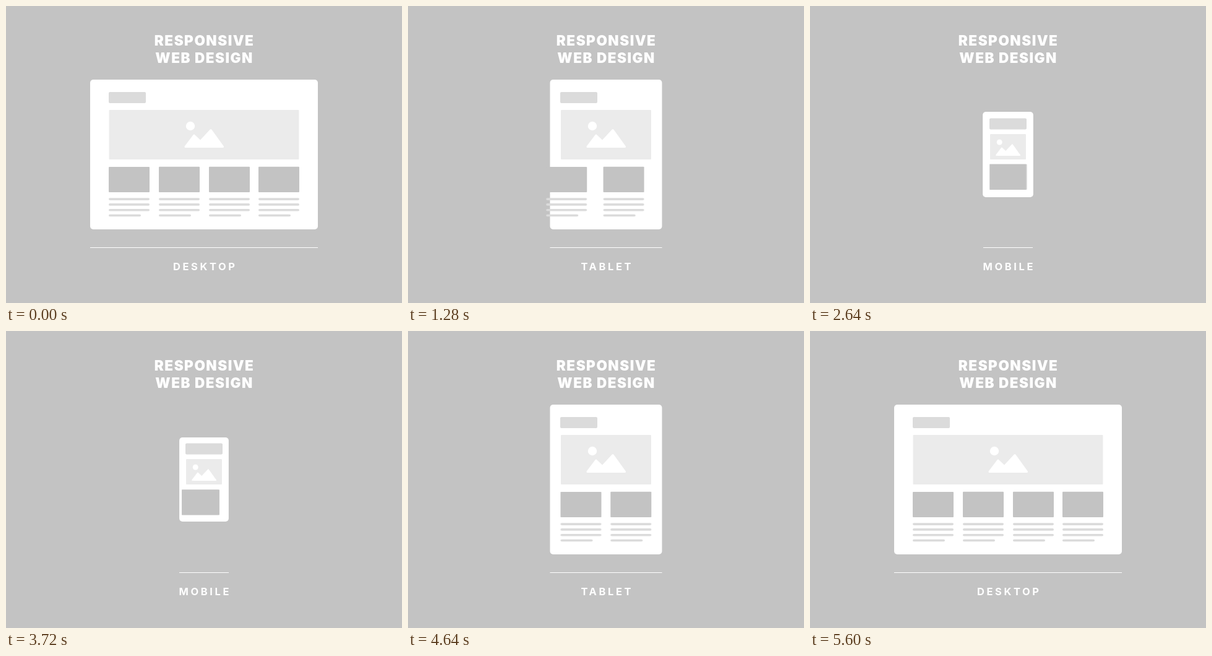
Recreate the animation shown at these times as an HTML page. Size 640x480 px, loop 5.72 s.

```html
<!DOCTYPE html>
<html lang="en">
<head>
<meta charset="utf-8">
<title>Responsive Web Design</title>
<style>
html, body { margin: 0; width: 100%; height: 100%; overflow: hidden; background: #c3c3c3; }
svg { display: block; width: 640px; height: 480px; }

.move { animation: 5720ms cubic-bezier(.65, 0, .35, 1) infinite; }
.show { animation: 5720ms step-end infinite; }

text { font-family: Inter, "Open Sans", sans-serif; fill: #fff; text-anchor: middle; }
.title { font-size: 22.5px; font-weight: 900; letter-spacing: 1.5px; }
.label { font-size: 16.5px; font-weight: 700; letter-spacing: 3.6px; }
.white { fill: #fff; }
.bar { fill: #dbdbdb; }
.card { fill: #c3c3c3; }
.hero { fill: #ebebeb; }
.fold { transform-box: fill-box; transform-origin: center; }

#panel { animation-name: panel; }
#rule { animation-name: rule; }
#logo { animation-name: logo; }
#hero { animation-name: hero-size, hero-y; }
#icon { animation-name: icon; }
#first { animation-name: slide-first; }
#second { animation-name: slide-second; }
#second-fold { animation-name: fold-second; }
#pair { animation-name: fold-pair; }
#main-card { animation-name: main-card; }
#l1 { animation-name: l1; }
#l2 { animation-name: l2; }
#l3 { animation-name: l3; }
#l4 { animation-name: l4; }
#desktop { animation-name: desktop; }
#tablet { animation-name: tablet; }
#mobile { animation-name: mobile; }

/* Desktop > tablet > mobile > tablet > desktop */
@keyframes panel {
  0%, 15.035% { x: 136px; y: 119px; width: 368px; height: 242px; }
  20.385% { x: 229.5px; y: 119px; width: 181px; height: 242px; }
  36.014% { x: 229.5px; y: 119px; width: 181px; height: 242px; animation-timing-function: cubic-bezier(.2, .8, .3, 1); }
  50.35% { x: 280px; y: 172px; width: 80px; height: 136px; }
  65.035% { x: 280px; y: 172px; width: 80px; height: 136px; animation-timing-function: cubic-bezier(.68, -.6, .32, 1.6); }
  72.098% { x: 229.5px; y: 119px; width: 181px; height: 242px; }
  85.315% { x: 229.5px; y: 119px; width: 181px; height: 242px; animation-timing-function: cubic-bezier(.68, -.6, .32, 1.6); }
  95.804%, 100% { x: 136px; y: 119px; width: 368px; height: 242px; }
}
@keyframes rule {
  0%, 15.035% { x: 136px; width: 368px; }
  20.629%, 36.014% { x: 229.5px; width: 181px; }
  41.958%, 66.084% { x: 280px; width: 80px; }
  73.077%, 87.832% { x: 229.5px; width: 181px; }
  95.035%, 100% { x: 136px; width: 368px; }
}
@keyframes logo {
  0%, 15.385% { x: 166px; y: 139px; }
  20.979%, 36.364% { x: 246px; y: 139px; }
  42.308%, 67.832% { x: 290px; y: 181.5px; }
  72.867%, 90.909% { x: 246px; y: 139px; }
  96.503%, 100% { x: 166px; y: 139px; }
}
@keyframes hero-size {
  0%, 15.734% { x: 166.5px; width: 307px; height: 80px; }
  21.678%, 36.713% { x: 247px; width: 146px; height: 80px; }
  43.007%, 65.734% { x: 291px; width: 58px; height: 41px; }
  71.294%, 88.811% { x: 247px; width: 146px; height: 80px; }
  96.154%, 100% { x: 166.5px; width: 307px; height: 80px; }
}
@keyframes hero-y {
  0%, 36.713% { y: 168px; }
  43.007%, 67.832% { y: 207px; }
  72.867%, 100% { y: 168px; }
}
@keyframes icon {
  0%, 36.713% { transform: translate(320px, 229px) scale(1); }
  43.007%, 68.741% { transform: translate(320px, 242px) scale(.625); }
  72.937%, 100% { transform: translate(320px, 229px) scale(1); }
}
@keyframes slide-first {
  0%, 18.531% { transform: translateX(0); }
  25.175% { transform: translateX(80.5px); }
  89.161% { transform: translateX(80.5px); animation-timing-function: cubic-bezier(.68, -.6, .32, 1.6); }
  97.902%, 100% { transform: translateX(0); }
}
@keyframes slide-second {
  0%, 18.182% { transform: translateX(0); }
  24.476% { transform: translateX(80.3px); }
  90.909% { transform: translateX(80.3px); animation-timing-function: cubic-bezier(.68, -.6, .32, 1.6); }
  97.902%, 100% { transform: translateX(0); }
}
@keyframes fold-second {
  0%, 36.014% { transform: scaleX(1); }
  39.51%, 66.434% { transform: scaleX(0); }
  70.455%, 100% { transform: scaleX(1); }
}
@keyframes fold-pair {
  0%, 15.035% { transform: scaleX(1); }
  20.385%, 92.308% { transform: scaleX(0); }
  97.902%, 100% { transform: scaleX(1); }
}
@keyframes main-card {
  0%, 37.413% { x: 166px; y: 260px; width: 66px; height: 41px; }
  44.755% { x: 209.5px; y: 255.5px; width: 60px; height: 41.5px; }
  64.685% { x: 209.5px; y: 255.5px; width: 60px; height: 41.5px; animation-timing-function: cubic-bezier(.3, .6, .3, 1); }
  69.93%, 100% { x: 166px; y: 260px; width: 66px; height: 41px; }
}
@keyframes l1 { 0%, 70.28%, 100% { opacity: 1; } 38.462% { opacity: 0; } }
@keyframes l2 { 0%, 70.979%, 100% { opacity: 1; } 37.762% { opacity: 0; } }
@keyframes l3 { 0%, 71.678%, 100% { opacity: 1; } 37.063% { opacity: 0; } }
@keyframes l4 { 0%, 72.378%, 100% { opacity: 1; } 36.364% { opacity: 0; } }

@keyframes desktop { 0%, 92.308%, 100% { opacity: 1; } 16.783% { opacity: 0; } }
@keyframes tablet { 0%, 37.762%, 92.308%, 100% { opacity: 0; } 16.783%, 67.483% { opacity: 1; } }
@keyframes mobile { 0%, 67.483%, 100% { opacity: 0; } 37.762% { opacity: 1; } }
</style>
</head>
<body>
<svg viewBox="0 0 640 480">
  <defs>
    <g id="column">
      <rect class="card" y="259.7" width="66" height="41.3" rx="1"/>
      <g class="bar">
        <rect y="310.2" width="66" height="3.7" rx="1.8"/>
        <rect y="319.1" width="66" height="3.7" rx="1.8"/>
        <rect y="327.9" width="66" height="3.7" rx="1.8"/>
        <rect y="336.7" width="52" height="3.5" rx="1.7"/>
      </g>
    </g>
  </defs>

  <text class="title" x="320.6" y="64">RESPONSIVE</text>
  <text class="title" x="320.6" y="92.2">WEB DESIGN</text>

  <rect id="panel" class="move white" x="136" y="119" width="368" height="242" rx="5"/>
  <rect id="logo" class="move bar" x="166" y="139" width="60" height="18" rx="2"/>

  <rect id="hero" class="move hero" x="166.5" y="168" width="307" height="80" rx="1"/>
  <g id="icon" class="move white">
    <circle cx="-22" cy="-35" r="7.2"/>
    <path d="M-30-1.5L-16-20L-6-10.3L11-28.5L30.5-1.5Z" stroke="#fff" stroke-width="3" stroke-linejoin="round"/>
  </g>

  <g id="pair" class="move fold">
    <use href="#column" x="328"/>
    <use href="#column" x="408"/>
  </g>
  <g id="second" class="move">
    <g id="second-fold" class="move fold"><use href="#column" x="247"/></g>
  </g>
  <g id="first" class="move">
    <rect id="main-card" class="move card" x="166" y="260" width="66" height="41" rx="1"/>
    <g class="bar">
      <rect id="l1" class="show" x="166" y="310.2" width="66" height="3.7" rx="1.8"/>
      <rect id="l2" class="show" x="166" y="319.1" width="66" height="3.7" rx="1.8"/>
      <rect id="l3" class="show" x="166" y="327.9" width="66" height="3.7" rx="1.8"/>
      <rect id="l4" class="show" x="166" y="336.7" width="52" height="3.5" rx="1.7"/>
    </g>
  </g>

  <rect id="rule" class="move white" x="136" y="390" width="368" height="1"/>
  <text id="desktop" class="label show" x="321.8" y="426.8">DESKTOP</text>
  <text id="tablet" class="label show" x="321.8" y="426.8">TABLET</text>
  <text id="mobile" class="label show" x="321.8" y="426.8">MOBILE</text>
</svg>
</body>
</html>
```
